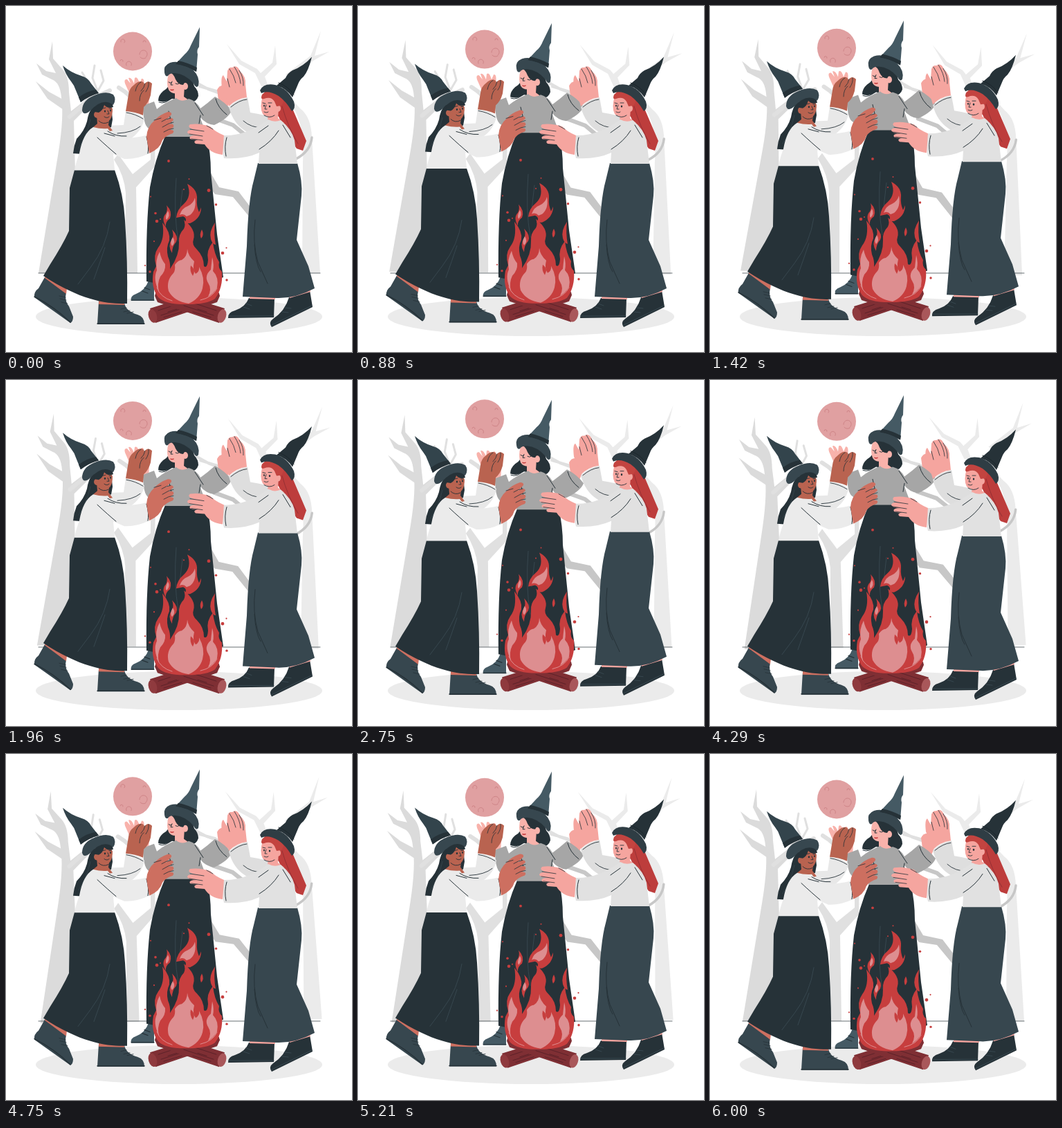
Write an HTML page with a canvas that moves like this. It is 500x500 px and loops after 6040 ms.

```html
<!DOCTYPE html>
<html lang="en">
<head>
<meta charset="utf-8">
<title>Witches by the fire</title>
<style>
html, body { margin: 0; width: 100%; height: 100%; overflow: hidden; background: #fff; }
canvas { display: block; width: 500px; height: 500px; }
</style>
</head>
<body>
<canvas id="stage"></canvas>
<script>
const LOOP = 6040;
const INK = '#263238', SLATE = '#37474f', STEEL = '#455a64';
const RED = '#c73e3e', ROSE = '#dd8e90', PINK = '#f5a59f', BROWN = '#b96350', TAN = '#cd6f60';
const canvas = document.getElementById('stage');
const ctx = canvas.getContext('2d');
const ratio = window.devicePixelRatio || 1;
canvas.width = canvas.height = 500 * ratio;

const cache = {};
const shape = d => cache[d] || (cache[d] = new Path2D(d));

function fill(color, d) {
  ctx.fillStyle = color;
  ctx.fill(shape(d));
}

function line(color, width, d) {
  ctx.strokeStyle = color;
  ctx.lineWidth = width;
  ctx.stroke(shape(d));
}

function oval(color, x, y, rx, ry = rx, turn = 0) {
  ctx.fillStyle = color;
  ctx.beginPath();
  ctx.ellipse(x, y, rx, ry, turn, 0, Math.PI * 2);
  ctx.fill();
}

// Rises 10px and returns once per period, after a delay.
function float(t, period, delay = 0) {
  const p = Math.max(0, t - delay) % period / period;
  return -10 * (1 - Math.abs(1 - 2 * p));
}

// Tilt in degrees: 0, 1 at a quarter, -1 at three quarters, 0.
function sway(t) {
  const p = t / 6000 % 1;
  return p < .25 ? p * 4 : p < .75 ? 2 - p * 4 : p * 4 - 4;
}

function shifted(dy, draw) {
  ctx.save();
  ctx.translate(0, dy);
  draw();
  ctx.restore();
}

function trees(angle) {
  ctx.save();
  ctx.translate(251, 211);
  ctx.rotate(angle * Math.PI / 180);
  ctx.translate(-251, -211);
  const pale = '#ebebeb', light = '#e0e0e0', mid = '#dbdbdb', dark = '#c7c7c7';

  // left trees
  fill(mid, 'M47 386 L76 210 Q84 160 80 132 Q78 110 66 106 L52 99 L44 83 L58 94 L72 97 L62 77 L67 51 L68 76 L82 92 Q91 102 91 125 L94 152 L112 138 L126 118 L130 126 L119 145 L98 166 L104 386 Z');
  fill(mid, 'M43 109 L62 124 L84 136 L86 152 L60 134 Z');
  fill(light, 'M172 386 L173 270 Q171 245 156 222 L162 214 L183 243 L209 222 L209 177 L216 177 L215 232 L188 262 L190 386 Z');
  line(light, 3, 'M128 86 L125 104 L132 122 M110 96 L122 116 M137 93 L141 108 L132 124');
  line(light, 6, 'M92 160 L120 136 L150 122 M163 118 L172 124 L190 140');

  // right trees
  fill(pale, 'M428 386 L429 225 Q432 180 418 152 L402 134 L408 130 L425 148 Q441 160 442 190 L454 386 Z');
  fill(pale, 'M319 55 L340 79 L363 91 L368 97 L385 82 L389 57 L391 84 L374 102 L379 116 L369 116 L360 97 L337 84 Z');
  fill(pale, 'M455 36 L446 72 L467 66 L444 79 L412 103 L404 99 L440 72 Z');
  line(light, 4, 'M270 108 L292 120 L320 130 M280 116 L304 123');
  line(dark, 3.5, 'M442 190 Q440 210 419 221');
  fill(dark, 'M295 240 L308 262 L336 268 L352 289 L352 305 L328 276 L302 272 L296 264 Z');
  line(dark, 6, 'M300 162 L328 172 L350 190');
  ctx.restore();
}

function moon() {
  oval('#e0a0a1', 183, 65.5, 28);
  const rim = '#ce8487';
  line(rim, 1, 'M193 70 a5.6 5.6 0 1 1 9 4 M194 74 a6 6 0 0 0 8 1 M166 52 a3 3 0 1 1 5 1 M198 52 a2 2 0 1 1 4 0 M174 86 a4 4 0 1 1 7 0 M165 79 a2 2 0 1 1 4 1');
}

function middleWitch() {
  // shoe and skirt
  fill(STEEL, 'M206 397 L214 397 L214 426 L181 426 Q179 419 188 416 Q201 411 206 397 Z');
  line(INK, 1.2, 'M181 425 L214 425 M197 412 l8 3 M200 407 l8 3');
  fill(INK, 'M230 188 L290 188 Q296 212 296 240 L305 330 L314 392 Q262 411 203 398 Q202 316 208 262 Q215 222 230 188 Z');
  line(SLATE, 1, 'M246 249 Q242 300 249 340 M255 265 L251 300');

  // hair, neck, face
  fill(INK, 'M238 104 Q237 118 227 123 Q220 129 220 137 Q229 141 240 134 L256 137 L264 139 Q275 140 278 130 Q278 122 272 116 L268 101 Z');
  line(INK, 1, 'M240 132 Q230 143 221 139 M268 126 Q275 142 265 138');
  fill('#f8b2ab', 'M244 122 L258 116 L257 131 L264 136 Q253 143 244 134 Z');
  fill('#f8b2ab', 'M235 98 Q231 112 235 121 Q239 128 249 126 Q258 120 257 105 L247 94 Z');
  oval('#f8b2ab', 259, 116, 4, 5);
  fill(INK, 'M236 96 Q242 97 245 106 Q249 114 256 114 L259 109 L266 112 L273 110 L262 94 L240 91 Z');
  line(INK, 1, 'M235 110 q2 2 4 1 M245 112 q3 2 5 0 M240 109 l-2 5 3 0');
  line(RED, 1.5, 'M238 121 q2 1 4 0');

  // hat
  fill(SLATE, 'M229 96 Q227 86 237 82 Q253 77 270 92 Q281 103 278 115 Q275 120 271 112 Q259 98 244 97 Q236 97 234 101 Q230 103 229 96 Z');
  fill(STEEL, 'M280 30.5 L267 57 Q264 65 258 70 L245 84 Q259 86 275 95 L277 70 Q275 64 279 59 Z');
  fill(INK, 'M249 79 Q263 82 276 89 L275 95 Q260 86 245 84 Z');

  // hands behind, sleeves, sweater
  fill('#f8b2ab', 'M180 130 L172 112 Q170 105 175 106 L180 112 L177 104 Q181 102 185 112 L186 104 Q190 101 193 112 L196 105 Q201 104 199 118 L208 116 L206 147 L190 151 Z');
  fill(PINK, 'M307 136 L305 121 Q310 112 318 116 L325 133 L320 146 Z');
  fill('#a6a6a6', 'M246 133 Q254 140 264 134 Q275 137 281 148 Q292 140 302 131 Q317 139 326 151 Q322 162 301 172 Q289 171 280 160 L291 189 L229 189 L233 157 Q223 176 210 178 Q198 178 198 144 L214 138 L218 149 Q230 139 246 133 Z');
  line(INK, 1, 'M273 140 L285 158 M303 134 Q306 147 319 157 M235 152 L239 169 M281 158 L279 170');
}

function leftWitch() {
  // shoes and skirt
  fill(SLATE, 'M56 392 L87 414 Q84 426 91 434 L97 449 Q97 456 93 458 L41 421 Q40 413 47 408 Z');
  line(INK, 1.5, 'M41 420 Q69 434 93 457');
  line(INK, .8, 'M78 423 l9 2 M80 428 l9 2 M77 419 l9 2');
  fill(SLATE, 'M134 427 L171 429 Q173 441 190 446 Q200 449 200 460 L132 460 Z');
  line(INK, 1.5, 'M132 459 L200 459');
  line(INK, .8, 'M166 438 l8 -2 M170 442 l9 -2 M175 444 l9 -2');
  fill(TAN, 'M57 387 L88 408 L87 416 L56 393 Z M134 425 L171 427 L171 432 L134 431 Z');
  fill(INK, 'M99 237 L157 237 Q170 272 172 310 Q176 370 175 430 C150 431 110 427 54 390 L64 373 Q82 345 91 325 L92 263 Z');
  line(SLATE, 1, 'M150 312 Q145 348 122 378 L104 402 M143 349 Q136 370 127 395');

  // far arm and hand
  fill('#e8e8e8', 'M145 173 L170 172 L173 152 Q189 153 200 162 Q197 180 180 192 L153 192 Z');
  line(INK, .9, 'M174 154 Q187 156 198 163 M161 184 Q183 183 194 174');
  fill(BROWN, 'M173 152 L177 128 Q178 119 185 114 Q190 109 195 109 Q199 109 200 113 Q205 106 211 112 L209 129 Q206 140 199 146 L198 158 Q187 153 173 152 Z');
  line(INK, .8, 'M187 123 Q189 113 195 110 M195 123 Q200 118 201 112 M202 124 Q207 117 206 110 M193 137 Q193 127 199 122');

  // hair and neck
  fill(INK, 'M126 145 Q119 153 117 167 Q113 181 102 192 Q98 202 97 213 L111 214 L127 184 L152 175 L154 164 L152 145 Z');
  line(SLATE, .8, 'M122 164 Q117 187 105 205');
  fill(BROWN, 'M131 157 L149 165 L148 172 L154 180 Q140 184 126 175 L132 170 Z');

  // torso and near arm
  fill('#ebebeb', 'M126 175 Q137 178 147 177 L157 190 Q176 193 203 187 Q206 198 207 213 Q188 222 171 221 L155 214 L157 237.5 L99 237.5 Q101 226 106 213 Q111 184 126 175 Z');
  line(INK, 1, 'M132 190 Q147 204 159 214 M203 189 Q207 203 205 213 M147 181 Q159 189 174 188 M157 188 L142 184');
  fill(TAN, 'M203 189 Q204 174 215 165 Q222 157 234 153 Q240 153 239 157 L231 165 Q241 159 242 165 L235 171 Q244 169 242 175 L237 179 Q245 179 241 184 Q231 187 226 194 Q223 206 207 213 Z');
  line(INK, .8, 'M225 167 Q231 163 238 162 M226 175 Q235 169 242 168 M228 182 Q236 177 242 177 M214 165 L224 162');

  // face
  fill(BROWN, 'M130 143 Q132 164 141 169 Q154 168 154 149 L149 139 L135 136 Z');
  oval(BROWN, 132, 157, 5);
  fill(INK, 'M127 146 Q136 134 153 139 L155 146 Q147 149 142 143 Q140 151 134 154 L128 153 Z');
  oval(INK, 143, 152, 1.2, 1.5);
  oval(INK, 151, 151, 1, 1.4);
  line(INK, .9, 'M140 148 l4 -1 M149 148 l3 0 M147 151 l2 5 -3 0 M142 160 q4 3 7 0 M134 166 q6 6 14 2');

  // hat
  fill(SLATE, 'M110 151 Q110 136 128 129 Q145 122 155 128 Q160 135 155 143 Q140 131 121 152 Q112 159 110 151 Z');
  fill('#33444c', 'M82 86 Q86 99 94 109 Q99 115 101 122 L108 139 Q119 129 134 126 L123 112 Q119 104 109 101 Q93 96 82 86 Z');
  fill(INK, 'M105 132 Q117 123 130 121 L134 126 Q120 130 108 139 Z');
}

function rightWitch() {
  // shoes and skirt
  fill(INK, 'M351 422 L388 423 L387 450 L321 451 Q320 443 331 440 Q346 435 351 422 Z');
  fill(INK, 'M409 421 L439 411 L443 435 L384 464 Q379 457 386 452 Q403 441 409 421 Z');
  line(SLATE, 1, 'M322 448 L387 448 M384 461 L442 433 M343 435 l9 3 M347 430 l8 3 M399 442 l9 1 M403 436 l9 1');
  fill(PINK, 'M352 417 L389 418 L389 424 L352 423 Z M408 417 L439 408 L440 413 L410 422 Z');
  fill(SLATE, 'M364 227 L421 227 Q429 254 427 274 L420 338 L437 376 L446 408 Q418 423 391 422 L342 420 L348 347 Q350 280 358 252 Z');
  line(INK, 1, 'M360 309 Q356 342 364 370 L378 401 M359 345 Q361 374 368 384');

  // far arm and hand
  fill('#dedede', 'M322 146 Q335 134 349 132 L353 154 Q374 157 389 163 L383 178 Q357 190 345 180 Q328 169 322 146 Z');
  line(INK, .9, 'M325 146 Q337 136 348 135 M343 166 Q354 176 371 176');
  fill(PINK, 'M320 138 L312 119 Q310 102 314 100 L319 109 L320 94 Q322 88 327 89 Q334 84 338 94 Q347 102 346 113 L348 132 Q333 134 322 145 Z');
  line(INK, .8, 'M320 105 L323 117 M323 91 Q330 101 332 111 M330 88 Q338 100 339 112 M337 93 Q344 104 343 115');

  // hair and neck
  fill('#bd3d3c', 'M389 125 Q407 128 413 146 L434 195 L429 209 L420 206 Q408 190 394 160 L383 148 Z');
  line('#8c2c32', .8, 'M399 145 Q407 174 422 199');
  fill(PINK, 'M379 156 L394 148 L393 162 L402 169 Q389 174 378 165 Z');

  // torso and near arm
  fill('#e1e1e1', 'M379 164 Q388 169 397 165 Q413 178 417 194 L421 228 L365 228 L366 212 Q344 222 315 220 Q311 204 315 187 Q347 188 379 164 Z');
  line(INK, 1, 'M319 190 Q315 203 318 217 M394 180 Q384 196 366 207 M400 172 L411 190 M365 183 L379 173');
  fill(PINK, 'M315 187 Q301 181 295 174 Q280 169 266 171 Q261 175 270 178 L277 180 Q262 177 262 183 L266 186 L276 187 Q263 187 266 192 Q270 194 278 193 Q269 195 274 199 L287 200 Q295 213 313 215 Z');
  line(INK, .8, 'M266 178 L286 181 M265 185 L284 188 M268 192 L284 194 M290 173 L299 178');

  // face
  fill(PINK, 'M371 130 Q366 147 371 156 Q380 164 390 155 Q397 145 392 132 Z');
  oval(PINK, 393, 148, 4, 5);
  fill('#c34440', 'M370 128 Q367 136 373 134 Q383 130 388 138 L391 145 L398 144 Q406 133 396 126 L380 119 Z');
  oval(INK, 373, 144, 1, 1.5);
  oval(INK, 381, 145, 1.2, 1.6);
  line(INK, .9, 'M371 140 l4 1 M379 140 l5 0 M376 143 l-2 6 3 0 M373 153 q4 2 6 0 M373 158 q8 5 15 0');

  // hat
  fill('#2f3d44', 'M367 122 Q372 111 389 114 Q407 119 416 138 Q419 148 413 152 Q405 138 394 130 Q379 121 369 126 Z');
  fill(INK, 'M442 73.5 Q430 87 414 93 Q407 97 404 104 L391 115 Q405 119 414 132 L422 113 Q424 107 430 102 Q437 94 442 73.5 Z');
  line('#1d272c', 1, 'M394 111 Q408 116 416 128');
}

function logs() {
  for (const side of [1, -1]) {
    ctx.save();
    ctx.translate(262, 0);
    ctx.scale(side, 1);
    fill('#7f2f34', 'M-54 437 L36 409 Q46 410 47 419 L43 428 L-46 458 Z');
    line('#5d2229', 1, 'M-42 440 L-5 428 M-38 447 L5 433 M-34 450 L-8 442 M-28 442 L-15 438');
    oval(side > 0 ? '#8f3a3e' : '#a9575a', -50, 448, 6, 10, -.3);
    ctx.restore();
  }
}

// x, y, radius
const sparks = [
  [235, 224, 1.9], [264.5, 250, 1], [257, 265, 1], [293, 266.5, 2.4], [303.5, 287, 1.7],
  [216, 299.5, 1.8], [218, 311, 2.3], [223, 308, 1], [209, 275.5, 1], [214, 340, 1.1],
  [313, 357, 2.3], [318.5, 349.5, 1.1], [319, 396, 1.7], [201, 375, 1.1], [208, 384, 1.7]
];

function flames() {
  fill(RED, 'M262 257 Q277 265 276 279 Q275 289 279 298 L282 291 Q282 307 266 314 L258 314 Q263 307 256 304 L246 306 Q247 294 257 286 Q269 275 262 257 Z');
  fill(ROSE, 'M273 277 Q276 294 266 302 L261 304 Q256 299 251 302 Q254 292 263 289 Q271 285 273 277 Z');
  fill(RED, 'M232 288 Q241 297 237 307 Q230 312 231 319 Q224 307 231 300 Q234 294 232 288 Z');
  fill(ROSE, 'M234 296 Q238 303 232 309 Q229 305 234 296 Z');

  // main blaze
  fill(RED, 'M226 313 Q238 327 236 339 Q231 349 234 362 Q238 371 237 380 Q251 360 250 341 Q249 330 257 322 Q260 316 257 309 Q275 323 271 337 Q268 345 276 352 Q286 362 286 376 Q291 380 292 367 Q289 353 299 341 Q301 359 308 370 Q306 379 312 384 Q314 407 302 423 Q290 431 263 431 Q231 432 220 421 Q209 407 213 384 L217 376 Q212 360 220 349 Q230 336 226 313 Z');
  fill(RED, 'M302 313 Q293 326 296 337 Q298 344 303 345 Q300 330 302 313 Z M283 323 Q279 330 282 336 Q287 331 283 323 Z');
  fill(RED, 'M240 323 Q250 333 246 341 Q240 347 240 357 Q233 346 240 337 Q243 331 240 323 Z');
  fill(ROSE, 'M241 334 Q246 341 240 347 Q236 342 241 334 Z');
  fill(ROSE, 'M262 351 Q263 361 272 369 Q269 381 274 387 Q280 384 279 377 Q288 393 284 408 Q280 423 264 430 Q243 427 235 412 Q231 397 242 386 Q245 382 244 374 Q249 367 254 367 Q262 362 262 351 Z');
  fill(RED, 'M267 375 Q265 383 270 390 Q275 381 267 375 Z');
  fill(ROSE, 'M222 355 Q224 366 230 373 Q231 383 223 391 Q218 401 221 413 Q212 394 218 382 Q215 368 222 355 Z');
  fill(ROSE, 'M298 363 Q301 374 299 383 Q308 392 305 407 Q300 416 292 420 Q298 409 292 400 Q286 390 296 381 Z');
  line(ROSE, 1, 'M218 407 Q223 421 240 426 M305 408 Q299 421 281 425');
  for (const [x, y, r] of sparks) oval(RED, x, y, r);
}

function fire() {
  logs();
  flames();
}

function render(t) {
  ctx.setTransform(ratio, 0, 0, ratio, 0, 0);
  ctx.fillStyle = '#fff';
  ctx.fillRect(0, 0, 500, 500);
  ctx.lineCap = ctx.lineJoin = 'round';
  trees(sway(t));
  line(INK, .7, 'M47 386 L454 386');
  oval('#ebebeb', 250, 449, 207, 28);
  shifted(float(t, 6000), moon);
  shifted(float(t, 3000), middleWitch);
  shifted(float(t, 3000, 500), leftWitch);
  shifted(float(t, 3000, 1000), rightWitch);
  shifted(float(t, 6000, 500), fire);
}

let start;
function tick(now) {
  if (start === undefined) start = now;
  render(Math.max(0, now - start) % LOOP);
  requestAnimationFrame(tick);
}
render(0);
requestAnimationFrame(tick);
</script>
</body>
</html>
```
